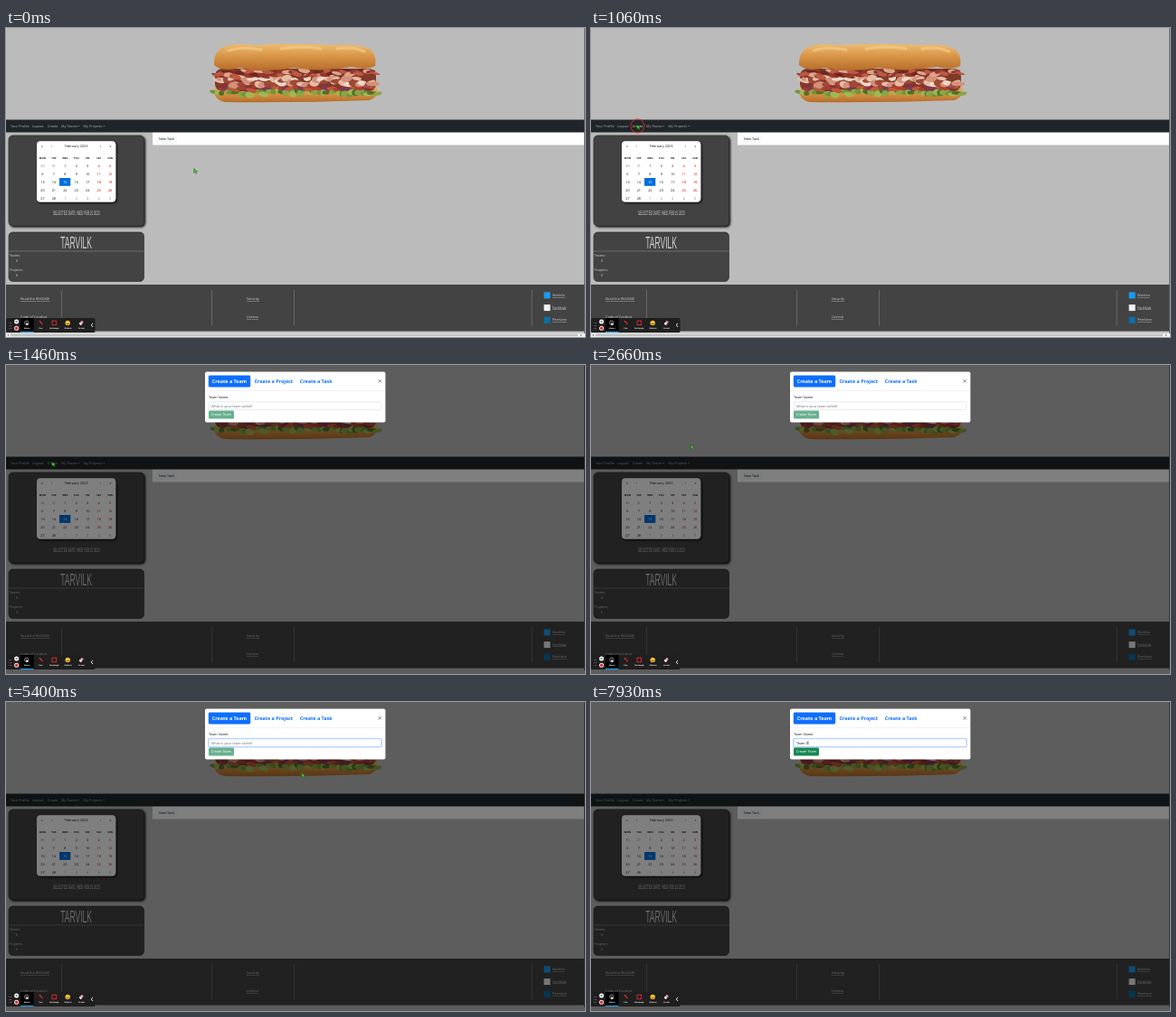
An HTML page that plays this animation: 640x342 px, repeating every 8 s.

```html
<!DOCTYPE html>
<html lang="en">
<head>
<meta charset="utf-8">
<title>Task planner</title>
<style>
html, body { margin: 0; width: 100%; height: 100%; overflow: hidden; background: #bbb; }
svg { display: block; width: 100%; height: 100%; }
text { font: 3.8px "Noto Sans", "Open Sans", sans-serif; text-rendering: geometricPrecision; white-space: pre; }
.mid { text-anchor: middle; }
.nav text { fill: #a3a5a7; }
.links text { fill: #c6c6c6; text-decoration: underline; }
.tabs text { font-size: 5.4px; font-weight: 600; fill: #0d6efd; }
.weekdays text { font-size: 2.8px; font-weight: 700; fill: #222; }
.tools text { font-size: 2.1px; font-weight: 700; fill: #fff; }
.lettering { font-family: "Liberation Sans", Arial, sans-serif; fill: #d0d0d0; }
</style>
</head>
<body>
<svg id="stage" viewBox="0 0 640 342" preserveAspectRatio="none">
  <defs>
    <linearGradient id="crust" x2="0" y2="1">
      <stop offset="0" stop-color="#edbd72"/><stop offset=".4" stop-color="#dc9a4b"/><stop offset="1" stop-color="#b66c29"/>
    </linearGradient>
    <filter id="shadow" x="-10%" y="-10%" width="125%" height="125%">
      <feDropShadow dx="1.3" dy="1.3" stdDeviation=".9" flood-color="#000" flood-opacity=".95"/>
    </filter>
  </defs>
  <rect width="640" height="342" fill="#bbb"/>
  <g id="sandwich"></g>
  <g id="page"></g>
  <g id="scrollbar">
    <rect y="336" width="640" height="2" fill="#c6c6c6"/>
    <rect y="338" width="640" height="4" fill="#f1f1f1"/>
    <rect x="5" y="338.6" width="627" height="2.6" fill="#c1c1c1"/>
    <path d="M3 339l-1.5 1 1.5 1zM635 339l1.5 1-1.5 1z" fill="#555"/>
  </g>
  <rect x="639.2" width=".8" height="338" fill="#555"/>
  <rect id="backdrop" width="640" height="342" opacity="0"/>
  <g id="modal"></g>
  <g id="toolbar"></g>
  <circle id="ring" r="7.6" fill="none" stroke="#d8282c" stroke-width="1"/>
  <g id="pointer">
    <path id="arrow" d="M-1.2-2.4V2.2L0 1.2 1 3.2 2 2.7 1.1 .8 2.6 .7Z" fill="#45d62c" stroke="#174d10" stroke-width=".45"/>
    <path id="beam" d="M-1.3-2.6H1.3M0-2.6V2.6M-1.3 2.6H1.3" fill="none" stroke="#1c5b18" stroke-width=".9"/>
  </g>
</svg>
<script>
const $ = id => document.getElementById(id);
const rect = (x, y, w, h, fill, more = '') =>
  `<rect x="${x}" y="${y}" width="${w}" height="${h}" fill="${fill}" ${more}/>`;
const label = (x, y, s, more = '') => `<text x="${x}" y="${y}" ${more}>${s}</text>`;
const mid = (x, y, s, more = '') => label(x, y, s, 'class="mid" ' + more);
const group = (name, ...parts) => `<g class="${name}">${parts.join('')}</g>`;
// Tall, narrow poster lettering
const lettering = (x, y, size, s) =>
  `<text class="mid lettering" style="font-size:${size}px" transform="translate(${x} ${y}) scale(.45 1)">${s}</text>`;

function drawSandwich() {
  let seed = 11;
  const rnd = () => (seed = seed * 16807 % 2147483647) / 2147483647;
  const layer = (count, x0, x1, y, spread, rx, ry, colors) => {
    let out = '';
    for (let i = 0; i < count; i++) {
      const x = x0 + (x1 - x0) * (i + rnd()) / count, cy = y + (rnd() - .5) * spread;
      out += `<ellipse cx="${x.toFixed(1)}" cy="${cy.toFixed(1)}" rx="${(rx * (.6 + rnd() * .7)).toFixed(1)}" ry="${(ry * (.6 + rnd() * .7)).toFixed(1)}" transform="rotate(${(rnd() * 40 - 20).toFixed()} ${x.toFixed(1)} ${cy.toFixed(1)})" fill="${colors[i % colors.length]}"/>`;
    }
    return out;
  };
  return '<path d="M230 67Q320 60 410 65Q412 77 402 80Q320 83 242 82Q229 79 230 67Z" fill="url(#crust)"/>' +
    rect(231, 45, 178, 25, '#80392b', 'rx="8"') +
    layer(44, 229, 411, 71, 6, 4.5, 3, ['#719537', '#a0b756', '#4e702a', '#8ba545']) +
    layer(24, 233, 406, 67, 4, 5.5, 1.8, ['#b43c2c', '#7f355c', '#c35639']) +
    layer(46, 233, 408, 59, 9, 6.5, 3.2, ['#e6bca4', '#d4907a', '#f0d8c6', '#9e4938']) +
    layer(42, 232, 409, 50, 8, 6.5, 2.3, ['#96382a', '#bd5941', '#6f2820', '#dfa38a']) +
    '<path d="M230 41Q229 27 240 21Q253 16 276 19Q322 16 362 19Q391 17 403 24Q410 31 408 42Q399 47 382 43Q350 49 318 44Q285 50 258 44Q239 49 230 41Z" fill="url(#crust)"/>' +
    '<path d="M246 25Q260 20 282 24M304 23Q326 19 348 23M366 23Q382 20 396 26" fill="none" stroke="#f3cf90" stroke-width="3" stroke-linecap="round" opacity=".6"/>';
}

function drawCalendar() {
  const colX = c => 40.4 + 12.45 * c, rowY = r => 153.7 + 8.95 * r;
  let out = rect(34, 125.3, 87.2, 67.3, '#fff', 'rx="4" filter="url(#shadow)"') +
    mid(77.6, 132, 'February 2023', 'fill="#222"');
  [['«', 39.7], ['‹', 50.6], ['›', 104.5], ['»', 115.5]].forEach(([s, x]) => out += mid(x, 132, s));
  out += group('weekdays', ...['MON', 'TUE', 'WED', 'THU', 'FRI', 'SAT', 'SUN'].map((d, c) => mid(colX(c), 145.2, d)));
  out += rect(59, 166, 12.3, 8.8, '#006edc');
  for (let i = 0; i < 35; i++) {
    const n = i - 1, r = Math.floor(i / 7), c = i % 7;
    const day = n < 1 ? n + 31 : n > 28 ? n - 28 : n;
    const fill = n === 15 ? '#fff' : n < 1 || n > 28 ? '#858585' : c > 4 ? '#d10000' : '#222';
    out += mid(colX(c), rowY(r), day, `fill="${fill}"`);
  }
  return out;
}

function drawPage() {
  const nav = [[5, 'Your Profile'], [29, 'Logout'], [45.8, 'Create', 'id="create"'], [61, 'My Teams'], [85.6, 'My Projects']];
  const links = [[16, 301, 'Read the README'], [16, 321, 'Code of Conduct'], [265.8, 301, 'Security'], [265.8, 321, 'License'],
    [604, 297, 'Warblio'], [604, 310.6, 'ForkNub'], [604, 324.3, 'Peerlane']];
  const card = (y, h) => rect(3, y, 149.5, h, '#434343', 'rx="4.5" stroke="#252525" stroke-width=".6"');
  return rect(0, 101.5, 639.2, 14, '#212529') +
    group('nav', ...nav.map(([x, y, more]) => label(x, 110.1, y, more))) +
    '<path d="M79.2 108h2l-1 1.1zM107.3 108h2l-1 1.1z" fill="#a3a5a7"/>' +
    rect(162, 115.8, 476.8, 13.7, '#fff') + rect(165.6, 118.4, 23.4, 8.5, '#f8f9fa', 'rx="1"') +
    label(169, 124.2, 'New Task', 'fill="#212529"') +
    `<g filter="url(#shadow)">${card(119, 100)}</g>` + drawCalendar() +
    lettering(77.8, 206.8, 6.7, 'SELECTED DATE: WED FEB 15 2023') +
    card(226, 54.5) + rect(3, 246.6, 149.5, .8, '#777') +
    lettering(77.6, 243.5, 19, 'TARVILK') +
    group('facts', ...[[3.6, 253.2, 'Teams:'], [11, 259, '0'], [3.6, 269.3, 'Projects:'], [11, 275.2, '0']]
      .map(([x, y, s]) => label(x, y, s, 'fill="#c6c6c6"'))) +
    rect(0, 284, 639.2, 51.6, '#434343') +
    [61, 227.3, 318.2, 580.8].map(x => rect(x, 290, .7, 39.5, '#777')).join('') +
    group('links', ...links.map(([x, y, s]) => label(x, y, s))) +
    ['#1d9bf0', '#f2f2f2', '#0a6fa8'].map((c, i) => rect(594.6, 292.4 + 13.7 * i, 7, 7, c)).join('');
}

function drawModal() {
  return rect(220, 7.6, 199.4, 56, '#fff', 'rx="1.8"') +
    rect(223.8, 11.5, 46.4, 13, '#0d6efd', 'rx="1.4"') +
    group('tabs', label(227.8, 20, 'Create a Team', 'style="fill:#fff"'),
      label(274.4, 20, 'Create a Project'), label(324.8, 20, 'Create a Task')) +
    '<path d="M411.5 16.1l3.4 3.4m0-3.4l-3.4 3.4" stroke="#666" stroke-width=".75"/>' +
    rect(220, 28.2, 199.4, .4, '#dee2e6') +
    label(224, 37.1, 'Team Name', 'fill="#212529"') +
    rect(223.7, 40.4, 191.6, 9.3, 'none', 'id="glow" rx="1.4" stroke="#c2dbfe" stroke-width="1.4"') +
    rect(224.1, 40.8, 190.8, 8.6, '#fff', 'id="field" rx="1" stroke-width=".5"') +
    label(227, 46.5, '', 'id="entry"') + rect(227, 42.9, .5, 4.5, '#222', 'id="caret"') +
    `<g id="submit">${rect(224, 50.4, 28, 9, '#198754', 'rx="1"')}${mid(238, 56.3, 'Create Team', 'fill="#fff"')}</g>`;
}

function drawToolbar() {
  const names = ['Mouse', 'Pen', 'Rectangle', 'Stickers', 'Eraser'];
  return rect(0, 321, 98.5, 16, '#1f1f1f', 'rx="1.5"') + rect(16, 321, 14.6, 16, '#000') +
    rect(16, 335.8, 14.6, 1.2, '#1b9cf2') +
    [326, 329, 332].map(y => rect(3.5, y, .7, .9, '#999') + rect(5.2, y, .7, .9, '#999')).join('') +
    '<circle cx="11.6" cy="325" r="2.5" fill="#fff"/><path d="M10.6 324l2 2m0-2l-2 2" stroke="#222" stroke-width=".6"/>' +
    '<circle cx="11.6" cy="332.3" r="2.5" fill="#fff"/><circle cx="11.6" cy="332.3" r="1.7" fill="#df2626"/>' +
    '<circle cx="22.7" cy="326.2" r="2.2" fill="none" stroke="#ddd" stroke-width=".6"/><path d="M22.4 325.4v4l1-1 2 .1z" fill="#fff"/>' +
    '<path d="M36.2 324.2l1.5-.4 3.2 4-.8.8z" fill="#e32b2b"/>' +
    rect(51, 324.1, 4.6, 4.6, 'none', 'stroke="#e32b2b" stroke-width=".9"') +
    '<circle cx="68.2" cy="326.4" r="2.7" fill="#f6bd37"/><path d="M66.8 327a1.5 1.4 0 0 0 2.8 0z" fill="#75431b"/>' +
    '<path d="M80.8 327.2l3-3.5 2 1.7-3 3.5z" fill="#f0a0b0"/><path d="M80.8 327.2l1-1.2 2 1.7-1 1.2z" fill="#fff"/>' +
    group('tools', ...names.map((s, i) => mid(23.2 + 15.1 * i, 333, s))) +
    '<path d="M96 326.8l-1.7 2.1 1.7 2.1" fill="none" stroke="#fff" stroke-width=".9"/>';
}

$('sandwich').innerHTML = drawSandwich();
$('page').innerHTML = drawPage();
$('modal').innerHTML = drawModal();
$('toolbar').innerHTML = drawToolbar();

const LOOP = 8000, OPEN = 1130, FOCUS = 3600;
const route = [[0, 208.8, 158], [200, 208.8, 158], [860, 52, 109.6], [2300, 52, 109.6], [3330, 263, 43], [4200, 263, 43], [5050, 328, 81]];
const keys = [[6460, 'T'], [6730, 'Te'], [6930, 'Tea'], [7130, 'Team'], [7400, 'Team '], [7860, 'Team S']];
const clamp = v => Math.min(1, Math.max(0, v));
const show = (id, on) => $(id).setAttribute('visibility', on ? 'visible' : 'hidden');

function pointerAt(t) {
  const i = route.findIndex(p => p[0] > t);
  if (i < 0) return route[route.length - 1].slice(1);
  const [t0, x0, y0] = route[i - 1], [t1, x1, y1] = route[i];
  const u = (t - t0) / (t1 - t0), e = u * u * (3 - 2 * u);
  return [x0 + (x1 - x0) * e, y0 + (y1 - y0) * e];
}

function render(t) {
  const opened = t >= OPEN, focused = t >= FOCUS;
  const fade = clamp((t - OPEN) / 150), slide = (1 - clamp((t - OPEN) / 300)) ** 3;
  $('backdrop').setAttribute('opacity', fade * .5);
  $('modal').setAttribute('opacity', fade);
  $('modal').setAttribute('transform', `translate(0 ${-12 * slide})`);
  show('scrollbar', !opened);

  const key = keys.filter(k => k[0] <= t).pop();
  const entry = $('entry');
  entry.textContent = key ? key[1] : 'What is your team called?';
  entry.setAttribute('fill', key ? '#212529' : '#6c757d');
  $('submit').setAttribute('opacity', key ? 1 : .65);
  $('field').setAttribute('stroke', focused ? '#86b7fe' : '#ced4da');
  show('glow', focused);
  $('caret').setAttribute('x', 227 + (key ? entry.getComputedTextLength() : 0));
  show('caret', focused && (t - (key ? key[0] : FOCUS)) % 1060 < 530);

  const [x, y] = pointerAt(t), overField = x > 224 && x < 415 && y > 40 && y < 50;
  const typing = t >= keys[0][0];
  $('pointer').setAttribute('transform', `translate(${x} ${y})`);
  show('arrow', !typing && !overField);
  show('beam', !typing && overField);
  $('create').style.fill = t > 800 && !opened ? '#d0d1d2' : '';
  $('ring').setAttribute('transform', `translate(${x - .6} ${y - 1.2})`);
  show('ring', (t >= 930 && t < 1150) || (t >= 3530 && t < 3720));
}

const start = performance.now();
function tick() {
  render((performance.now() - start) % LOOP);
  requestAnimationFrame(tick);
}
tick();
</script>
</body>
</html>
```
